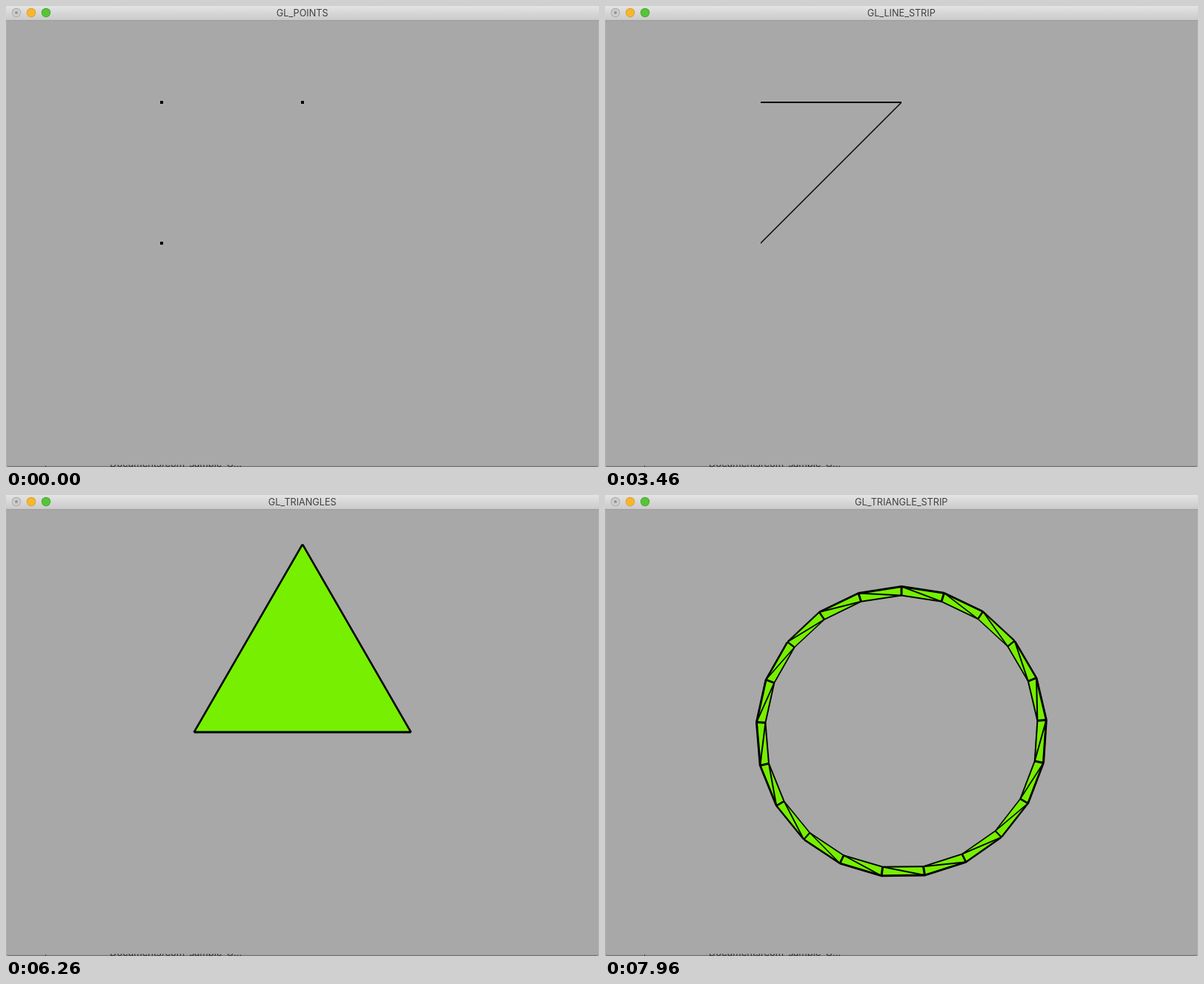
An HTML page with a canvas that plays this animation: 800 by 622 pixels, repeating every 8000 ms.

```html
<!DOCTYPE html>
<html lang="en">
<head>
<meta charset="utf-8">
<title>OpenGL primitives</title>
<style>
  html, body { margin: 0; width: 100%; height: 100%; overflow: hidden; background: #a8a8a8; }
  canvas { display: block; }
</style>
</head>
<body>
<canvas id="stage" width="800" height="622"></canvas>
<script>
const ctx = document.getElementById('stage').getContext('2d');
const LOOP = 8000;
const GREEN = '#76f000';
const [CORNER_A, CORNER_B, CORNER_C] = [[210, 130], [400, 130], [210, 320]];

function rect(color, x, y, w, h) {
  ctx.fillStyle = color;
  ctx.fillRect(x, y, w, h);
}

function polygon(color, points) {
  ctx.fillStyle = color;
  ctx.beginPath();
  points.forEach(p => ctx.lineTo(...p));
  ctx.fill();
}

function circle(color, x, y, r) {
  ctx.fillStyle = color;
  ctx.beginPath();
  ctx.arc(x, y, r, 0, 2 * Math.PI);
  ctx.fill();
}

// As in OpenGL, the width is measured along the minor axis.
function line([x1, y1], [x2, y2], width) {
  const steep = Math.abs(y2 - y1) > Math.abs(x2 - x1);
  const dx = steep ? width / 2 : 0;
  const dy = steep ? 0 : width / 2;
  polygon('#000', [[x1 - dx, y1 - dy], [x2 - dx, y2 - dy], [x2 + dx, y2 + dy], [x1 + dx, y1 + dy]]);
}

function drawPoints() {
  for (const [x, y] of [CORNER_A, CORNER_B, CORNER_C]) rect('#000', x - 2, y - 2, 4, 4);
}

function drawLines() {
  line(CORNER_A, CORNER_B, 2);
}

function drawLineStrip() {
  drawLines();
  line(CORNER_B, CORNER_C, 2);
}

function drawLineLoop() {
  drawLineStrip();
  line(CORNER_C, CORNER_A, 2);
}

function drawTriangle() {
  const corners = [[400, 66.5], [546.3, 320], [253.7, 320]];
  polygon(GREEN, corners);
  corners.forEach((p, i) => line(p, corners[(i + 1) % 3], 3));
}

function drawTriangleStrip() {
  const count = 21;
  const vertex = (k, radius) => {
    const degrees = 360 / count * k - 0.65 * Math.sin(Math.PI * k / count);
    const angle = degrees * Math.PI / 180;
    return [400 + radius * Math.sin(angle), 319.6 - radius * Math.cos(angle)];
  };
  const segments = Array.from({ length: count }, (_, k) =>
    [vertex(k, 196), vertex(k + 1, 196), vertex(k + 1, 184), vertex(k, 184)]);
  segments.forEach(s => polygon(GREEN, s));
  for (const [outer, nextOuter, nextInner, inner] of segments) {
    line(outer, nextOuter, 3);
    line(outer, inner, 3);
    line(inner, nextInner, 2);
    line(outer, nextInner, 2);
  }
}

const scenes = [
  [0, 'GL_POINTS', drawPoints],
  [500, 'GL_LINES', drawLines],
  [2340, 'GL_LINE_STRIP', drawLineStrip],
  [4180, 'GL_LINE_LOOP', drawLineLoop],
  [5700, 'GL_TRIANGLES', drawTriangle],
  [7120, 'GL_TRIANGLE_STRIP', drawTriangleStrip],
];

function drawBottomEdge() {
  rect('#999', 1, 620, 798, 1);
  rect('#747474', 2, 621, 796, 1);
  rect('#444', 53, 620, 1, 2);
  ctx.save();
  ctx.beginPath();
  ctx.rect(0, 619, 800, 3);
  ctx.clip();
  ctx.font = '13px Inter, sans-serif';
  ctx.textAlign = 'left';
  ctx.fillStyle = '#333';
  ctx.fillText('Documents/com-sample-G...', 140, 622);
  ctx.restore();
}

function drawWindow(title) {
  rect('#a8a8a8', 0, 0, 800, 622);
  rect('#b2b2b2', 0, 20, 1, 600);
  rect('#b2b2b2', 799, 20, 1, 600);
  const bar = ctx.createLinearGradient(0, 0, 0, 19);
  bar.addColorStop(0, '#e4e4e4');
  bar.addColorStop(1, '#cacaca');
  rect(bar, 0, 0, 800, 19);
  rect('#9c9c9c', 0, 19, 800, 1);

  const buttons = [['#a9a9a9', '#cdcdcd'], ['#dc9e2b', '#f8b62c'], ['#42a92d', '#58c437']];
  buttons.forEach(([border, fill], i) => {
    circle(border, 14 + 20 * i, 9, 6.2);
    circle(fill, 14 + 20 * i, 9, 5.3);
  });
  circle('#969696', 14, 9, 2);

  ctx.font = '12.65px Inter, sans-serif';
  ctx.textAlign = 'center';
  ctx.fillStyle = '#404040';
  ctx.fillText(title, 399.7, 14);
  drawBottomEdge();
}

function render() {
  const time = performance.now() % LOOP;
  const [, title, draw] = scenes.findLast(([start]) => time >= start);
  drawWindow(title);
  draw();
  requestAnimationFrame(render);
}

render();
</script>
</body>
</html>
```
